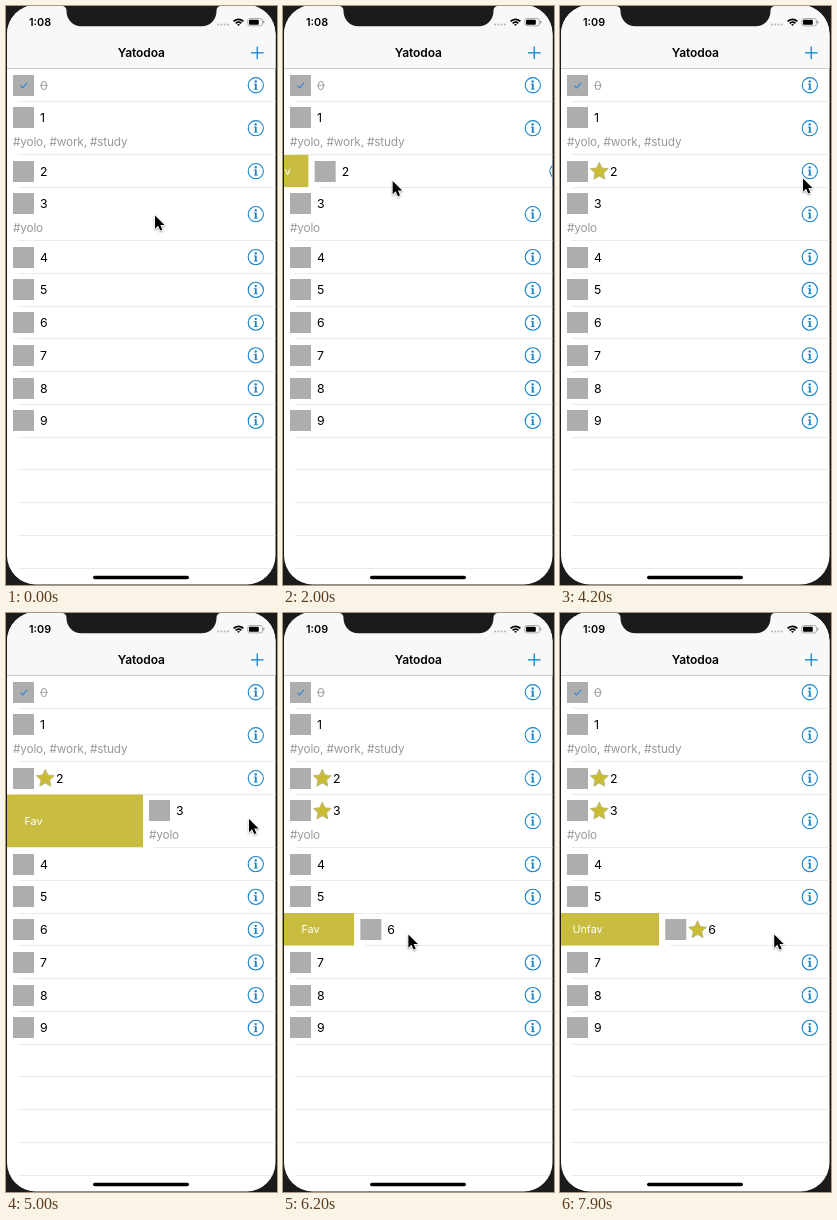
Write an HTML page with a canvas that moves like this. It is 271x579 px and loops after 8 s.

```html
<!DOCTYPE html>
<html lang="en">
<head>
<meta charset="utf-8">
<title>Todo list</title>
<style>
  html, body { margin: 0; width: 100%; height: 100%; overflow: hidden; background: #1b1b1b; }
  canvas { display: block; width: 271px; height: 579px; }
</style>
</head>
<body>
<canvas id="stage"></canvas>
<script>
const W = 271, H = 579, LOOP = 8000, STEP = 100, ROW = 32.75, TALL = 53.2;
const BEZEL = '#1b1b1b', BLUE = '#1583cc', YELLOW = '#c8bd40', LINE = '#ebebed', GRAY = '#adadad';
const TAGS = { 1: '#yolo, #work, #study', 3: '#yolo' };
const canvas = document.getElementById('stage');
const ctx = canvas.getContext('2d');
const ratio = window.devicePixelRatio || 1;
canvas.width = W * ratio;
canvas.height = H * ratio;

const rows = [];
let listEnd = 62.65;
for (let id = 0; id < 10; id++) {
  const h = TAGS[id] ? TALL : ROW;
  rows.push({ id, y: listEnd, h, tag: TAGS[id] });
  listEnd += h;
}

// Pointer moves: start time, duration, end x, end y.
const moves = [
  [700, 100, 145, 209.5], [900, 300, 57, 176], [1500, 1400, 243, 172.5],
  [4200, 300, 100, 203], [4500, 500, 243, 206], [5400, 500, 55, 321.5],
  [5900, 700, 236, 321.5], [6900, 500, 116, 321.5], [7500, 600, 247, 321.5]
];

// A row follows the pointer from the grab point until release.
const swipes = [
  { row: 2, grab: 85, start: 1500, release: 2900, label: 'Fav' },
  { row: 3, grab: 107, start: 4500, release: 5100, label: 'Fav' },
  { row: 6, grab: 55, start: 5900, release: 6700, label: 'Fav' },
  { row: 6, grab: 116, start: 7500, release: LOOP, label: 'Unfav' }
];
const SETTLE = 500;

const mix = (a, b, p) => a + (b - a) * p;
const clamp = p => Math.max(0, Math.min(1, p));
const ease = p => (1 - Math.cos(Math.PI * p)) / 2;

function pointerAt(t) {
  let pos = { x: 149, y: 209.5 };
  for (const [start, time, x, y] of moves) {
    const p = ease(clamp((t - start) / time));
    pos = { x: mix(pos.x, x, p), y: mix(pos.y, y, p) };
  }
  return pos;
}

function offsetOf(swipe, t) {
  const pull = pointerAt(Math.min(t, swipe.release)).x - swipe.grab;
  const left = 1 - clamp((t - swipe.release) / SETTLE);
  return Math.max(0, pull) * left ** 3;
}

const isStarred = (id, t) =>
  swipes.some(s => s.row === id && s.label === 'Fav' && t >= s.release + 200);

function text(str, x, y, size, color, weight = 400, align = 'left', spacing = 0) {
  ctx.font = `${weight} ${size}px Inter, Roboto, sans-serif`;
  ctx.letterSpacing = spacing + 'px';
  ctx.textAlign = align;
  ctx.fillStyle = color;
  ctx.fillText(str, x, y);
}

function rect(x, y, w, h, color) {
  ctx.fillStyle = color;
  ctx.fillRect(x, y, w, h);
}

function round(x, y, w, h, r, color) {
  ctx.beginPath();
  ctx.roundRect(x, y, w, h, r);
  ctx.fillStyle = color;
  ctx.fill();
}

function stroke(color, width) {
  ctx.strokeStyle = color;
  ctx.lineWidth = width;
  ctx.stroke();
}

function info(x, y) {
  ctx.beginPath();
  ctx.arc(x, y, 7.6, 0, Math.PI * 2);
  stroke(BLUE, 1.1);
  round(x - 1.3, y - 5, 2.4, 2.4, 1.2, BLUE);
  rect(x - 0.9, y - 1.5, 1.8, 5.6, BLUE);
  rect(x - 2, y - 1.5, 2, 0.8, BLUE);
  rect(x - 2, y + 3.5, 4, 0.8, BLUE);
}

function star(x, y) {
  ctx.beginPath();
  for (let i = 0; i < 10; i++) {
    const r = i % 2 ? 4.5 : 9.4;
    const a = i * Math.PI / 5 - Math.PI / 2;
    ctx.lineTo(x + r * Math.cos(a), y + r * Math.sin(a));
  }
  ctx.closePath();
  ctx.fillStyle = '#c8bd34';
  ctx.fill();
  stroke('#b5af78', 0.8);
}

function checkbox(y, done) {
  rect(7, Math.round(y - 10.5), 21, 21, GRAY);
  if (!done) return;
  ctx.beginPath();
  ctx.moveTo(14.3, y + 0.5);
  ctx.lineTo(16.6, y + 2.7);
  ctx.lineTo(21, y - 2.2);
  stroke('#2f83dc', 1.1);
}

function drawAction(row, label, off) {
  ctx.save();
  ctx.beginPath();
  ctx.rect(1, row.y, off, row.h);
  ctx.clip();
  rect(1, row.y, off, row.h, YELLOW);
  const x = mix(Math.min(27.5, off - 26), off - 29, clamp((off - 138) / 11));
  text(label, x, row.y + row.h / 2 + 4, 10.8, '#fff', 400, 'center');
  ctx.restore();
}

function drawRow(row, t) {
  const swipe = swipes.find(s => s.row === row.id && t > s.start && t < s.release + SETTLE);
  const off = swipe ? offsetOf(swipe, t) : 0;
  const mid = row.y + 16.5;
  const done = row.id === 0;
  const starred = isStarred(row.id, t);
  if (off > 0) drawAction(row, swipe.label, off);

  ctx.save();
  ctx.translate(off, 0);
  checkbox(mid, done);
  if (starred) star(39.3, mid + 0.5);
  text(row.id, starred ? 50 : 34, mid + 4.5, 12.3, done ? '#a3a3a3' : '#000');
  if (done) rect(34, mid - 0.3, 8, 0.9, '#a3a3a3');
  if (row.tag) text(row.tag, 7, mid + 28.2, 11.8, '#999', 400, 'left', -0.17);
  info(249.8, row.y + row.h / 2 + 0.2);
  rect(12, Math.floor(row.y + row.h), W, 1, LINE);
  ctx.restore();
}

function drawStatus() {
  for (let i = 0; i < 4; i++) round(211 + i * 3.3, 17.6, 2, 2, 1, '#b5b5b5');
  for (const r of [1.1, 3.9, 6.7]) {
    ctx.beginPath();
    ctx.arc(232.5, 20, r, -Math.PI * 0.76, -Math.PI * 0.24);
    stroke('#000', 1.7);
  }
  ctx.beginPath();
  ctx.roundRect(241.8, 12.5, 14.6, 7.4, 2);
  stroke('#999', 0.8);
  round(243, 13.7, 9.8, 5, 1, '#000');
  round(257.2, 14.8, 1.1, 2.8, 0.5, '#999');
}

function drawHeader(t) {
  rect(0, 0, W, 62, '#f8f8f8');
  rect(0, 62, W, 1, '#cbcbcd');
  text(t < 3700 ? '1:08' : '1:09', 23, 20, 10.8, '#000', 600);
  text('Yatodoa', 135.3, 51.3, 12, '#000', 600, 'center', -0.1);
  rect(245, 46.2, 12.6, 1.3, BLUE);
  rect(250.6, 40.5, 1.3, 12.6, BLUE);
  drawStatus();
}

function drawNotch() {
  const mid = 135.5, bottom = 20.3;
  ctx.beginPath();
  ctx.moveTo(mid - 79.5, 0);
  ctx.arcTo(mid - 75, 0, mid - 75, bottom, 4.5);
  ctx.arcTo(mid - 75, bottom, mid, bottom, 15);
  ctx.arcTo(mid + 75, bottom, mid + 75, 0, 15);
  ctx.arcTo(mid + 75, 0, mid + 79.5, 0, 4.5);
  ctx.lineTo(mid + 79.5, 0);
  ctx.fillStyle = BEZEL;
  ctx.fill();
}

function drawPointer(t) {
  const { x, y } = pointerAt(t);
  ctx.save();
  ctx.translate(x, y);
  ctx.scale(0.9, 0.9);
  const arrow = new Path2D('M0 0V14.6L3.4 11.5 5.8 16.8 8.2 15.8 5.9 10.6H10.6Z');
  ctx.shadowColor = 'rgba(0,0,0,.35)';
  ctx.shadowBlur = 2 * ratio;
  ctx.shadowOffsetY = ratio;
  ctx.strokeStyle = '#fff';
  ctx.lineWidth = 1.8;
  ctx.lineJoin = 'round';
  ctx.stroke(arrow);
  ctx.shadowColor = 'transparent';
  ctx.fillStyle = '#000';
  ctx.fill(arrow);
  ctx.restore();
}

function draw(t) {
  ctx.setTransform(ratio, 0, 0, ratio, 0, 0);
  rect(0, 0, W, H, BEZEL);
  ctx.save();
  ctx.beginPath();
  ctx.roundRect(1, -1, 268.5, 579.5, 29);
  ctx.clip();
  rect(0, 0, W, H, '#fff');
  rows.forEach(row => drawRow(row, t));
  for (let i = 1; i <= 4; i++) rect(12, Math.floor(listEnd + i * ROW), W, 1, LINE);
  drawHeader(t);
  round(87, 569.7, 96, 3.6, 1.8, '#000');
  ctx.restore();
  drawNotch();
  drawPointer(t);
}

const start = performance.now();
function frame() {
  const t = (performance.now() - start) % LOOP;
  draw(Math.floor(t / STEP) * STEP);
  requestAnimationFrame(frame);
}
frame();
</script>
</body>
</html>
```
